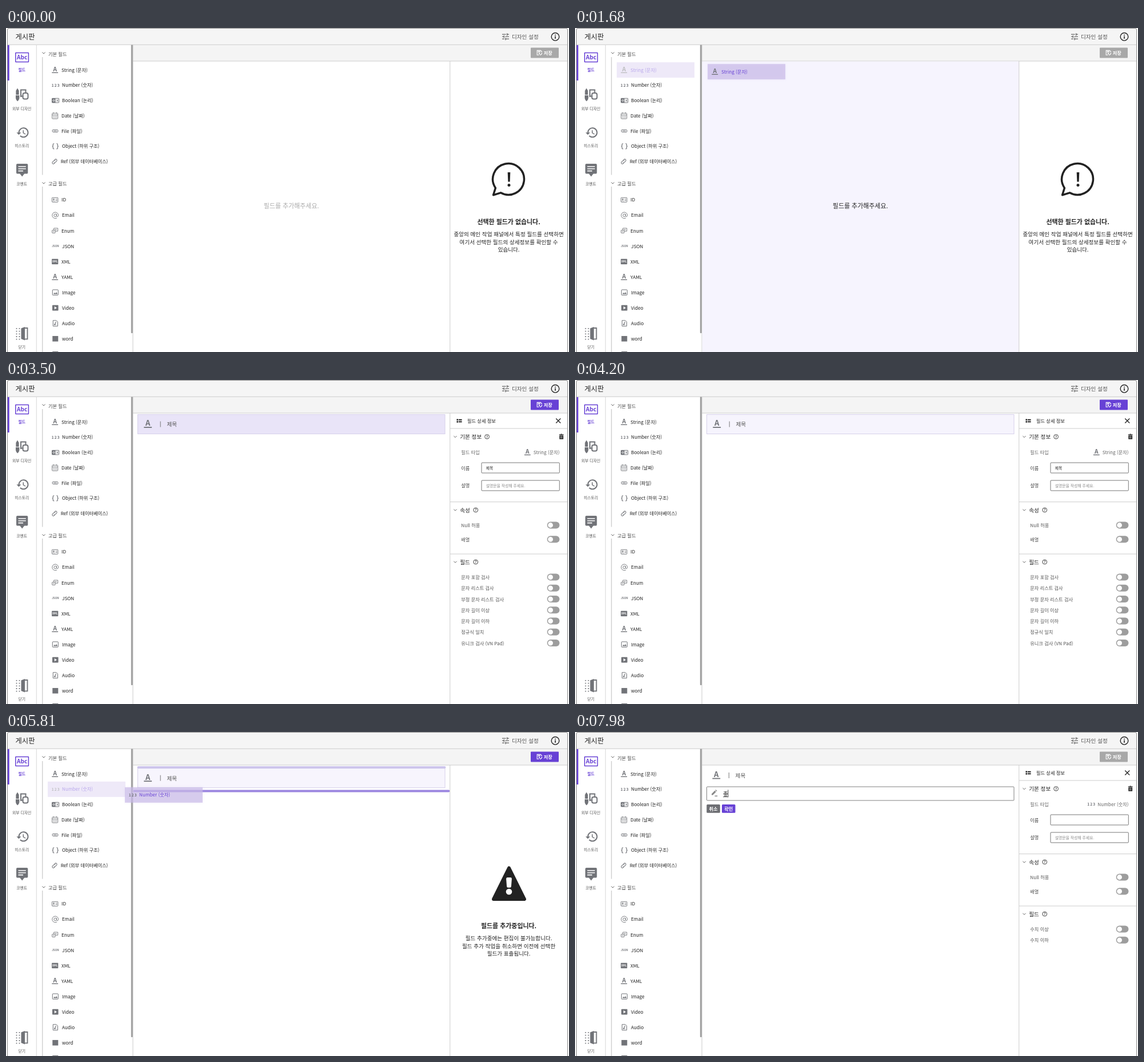
Animation of 985 by 568 pixels, one loop 8 s. Source, as an HTML page:

```html
<!DOCTYPE html>
<html lang="ko">
<head>
<meta charset="utf-8">
<title>게시판</title>
<style>
html, body { margin: 0; width: 100%; height: 100%; overflow: hidden; background: #fff; }
svg { display: block; width: 985px; height: 568px; }
text { font-family: "Noto Sans CJK KR", "Noto Sans CJK", "Noto Sans", sans-serif; white-space: pre; }
</style>
</head>
<body>
<svg id="stage" viewBox="0 0 985 568" xmlns="http://www.w3.org/2000/svg"></svg>
<script>
const PURPLE = '#6741d5', GRAY = '#717378', INK = '#222', LINE = '#ccc';
const XS = 6.84, S = 8.2, M = 9.58, L = 10.95;

// Basic shapes; text is placed by its vertical centre.
const text = (x, cy, str, size = S, fill = INK, weight = 400, anchor = 'start') =>
  `<text x="${x}" y="${cy + size * 0.38}" font-size="${size}" fill="${fill}" font-weight="${weight}" text-anchor="${anchor}">${str}</text>`;
const mid = (x, cy, str, size, fill, weight) => text(x, cy, str, size, fill, weight, 'middle');
const rect = (x, y, w, h, fill, extra = '') =>
  `<rect x="${x}" y="${y}" width="${w}" height="${h}" fill="${fill}" ${extra}/>`;
const box = (x, y, w, h, stroke, fill = 'none', r = 0, sw = 1) =>
  rect(x, y, w, h, fill, `stroke="${stroke}" stroke-width="${sw}" rx="${r}"`);
const path = (d, stroke, sw = 1, fill = 'none', extra = '') =>
  `<path d="${d}" stroke="${stroke}" stroke-width="${sw}" fill="${fill}" ${extra}/>`;
const solid = (d, fill) => `<path d="${d}" fill="${fill}" fill-rule="evenodd"/>`;
const ring = (x, y, r, stroke, sw = 1, fill = 'none') =>
  `<circle cx="${x}" cy="${y}" r="${r}" stroke="${stroke}" stroke-width="${sw}" fill="${fill}"/>`;
const dot = (x, y, r, fill) => `<circle cx="${x}" cy="${y}" r="${r}" fill="${fill}"/>`;
const at = (x, y, inner, scale = 1) => `<g transform="translate(${x} ${y}) scale(${scale})">${inner}</g>`;
const chevron = (x, y) => path(`M${x - 2.6} ${y - 1.3}l2.6 2.6 2.6-2.6`, '#555', 0.9);

// Field icons, drawn around 0,0.
const icons = {
  letter: c => mid(0, -1.2, 'A', 10.2, c, 600) + rect(-5.4, 4, 10.8, 1.4, c),
  digits: c => `<text x="-6.7" y="2.4" font-size="6.7" font-weight="700" fill="${c}" letter-spacing="1">123</text>`,
  bool: c => box(-6, -3.8, 12, 7.6, c, 'none', 0.6) + rect(-6, -3.8, 6, 7.6, c) +
    ring(-3, 0, 1.5, '#fff', 0.9) + path('M2 -1.8l2.4 3.6M4.4 -1.8l-2.4 3.6', c, 0.9),
  date: c => box(-5, -4.5, 10, 9.8, c, 'none', 1, 0.9) + path('M-5 -1.5H5M-2.7 -6V-3.5M2.7 -6V-3.5', c, 0.9) +
    path('M-3.2 1H3.4M-3.2 3.2H3.4', c, 1.1, 'none', 'stroke-dasharray="1.3 1.3"'),
  clip: c => path('M4 1.9H-2.6a1.9 1.9 0 0 1 0-4.2H3.2a2.1 2.1 0 0 1 0 4.4M3 -.2H-2.4', c, 1),
  braces: c => path('M-2 -4.6h-.8q-1.2 0-1.2 1.2v1.8q0 1.4-1.4 1.6q1.4.2 1.4 1.6v1.8q0 1.2 1.2 1.2h.8' +
    'M2 -4.6h.8q1.2 0 1.2 1.2v1.8q0 1.4 1.4 1.6q-1.4.2-1.4 1.6v1.8q0 1.2-1.2 1.2h-.8', c, 1.2),
  link: c => `<g transform="rotate(-45)">${path('M-1 2H-3a2 2 0 0 1 0-4H.4a2 2 0 0 1 1.6 2M1 -2H3a2 2 0 0 1 0 4H-.4a2 2 0 0 1-1.6-2', c, 1)}</g>`,
  card: c => box(-5.2, -4, 10.4, 8, c, 'none', 0.8, 0.9) + ring(-2.2, -1, 1, c, 0.8, c) +
    path('M-4 2.3q1.8-2 3.6 0M1 -1.2H4M1 1.2H4', c, 0.9),
  mail: c => ring(0, 0, 2.3, c, 0.9) + path('M2.3 -2.3V.8q.2 1.6 1.6 1.5 1.5-.2 1.5-2.3a5.4 5.4 0 1 0-2.4 4.5', c, 0.9),
  list: c => box(-5, -1, 5.5, 5, c, 'none', 0.5, 0.9) + path('M-2 -1v-3.4h7v5.2h-4.5M0 -2h3M-3.6 1.5h2.6', c, 0.9),
  json: c => mid(0, 0, 'JSON', 4.6, c, 900),
  xml: c => rect(-5.6, -4.8, 11.2, 9.6, c, 'rx="0.8"') + mid(0, 0, 'XML', 4.6, '#fff', 900),
  image: c => box(-5, -4.7, 10, 9.4, c, 'none', 0.8, 1) + solid('M-3.4 3l2-2.8 1.5 1.7 1.7-2.5 2.2 3.6z', c),
  video: c => rect(-5.3, -4.9, 10.6, 9.8, c, 'rx="1"') + solid('M-1.5 -2.6L2.7 0-1.5 2.6z', '#fff'),
  audio: c => path('M-4 -5H1.8L4.2 -2.5V5H-4z', c, 1) + ring(-1, 2, 1, c, 0.8, c) + path('M.1 2V-2H2.2', c, 0.9),
  square: c => rect(-5, -4.8, 10, 9.6, c)
};

// label, text x, icon, icon x, centre y
const basic = [
  ['String (문자)', 97, 'letter', 85.7], ['Number (숫자)', 98, 'digits', 86.5], ['Boolean (논리)', 98, 'bool', 86.6],
  ['Date (날짜)', 97, 'date', 85.7], ['File (파일)', 97, 'clip', 85.7], ['Object (하위 구조)', 98, 'braces', 86.3],
  ['Ref (외부 데이터베이스)', 95.7, 'link', 85]
].map((f, i) => [...f, 73.6 + i * 26.75]);
const advanced = [
  ['ID', 97, 'card', 85.7], ['Email', 98, 'mail', 86.2], ['Enum', 97, 'list', 85.7], ['JSON', 98, 'json', 86.4],
  ['XML', 97, 'xml', 85.7], ['YAML', 97, 'letter', 85.7], ['Image', 98, 'image', 86.3], ['Video', 98, 'video', 86.3],
  ['Audio', 98, 'audio', 86.3], ['word', 98, 'square', 86.3], ['', 98, 'square', 86.3]
].map((f, i) => [...f, 301.3 + i * 27.05]);

const field = ([label, x, icon, ix, y], color = INK) => at(ix, y, icons[icon](GRAY)) + text(x, y, label, S, color, 500);
const fieldBack = (f, fill, extra) => rect(73, f[4] - 13.5, 136, 27, fill, extra);
const activeField = f => fieldBack(f, '#dacff1') + field(f, PURPLE);

function fieldItem(i, s) {
  const f = basic[i];
  if (s.drag === i) return `<g opacity="0.45">${activeField(f)}</g>`;
  return s.hover === i ? activeField(f) : field(f);
}

function ghost(s) {
  const f = basic[s.drag];
  return at(s.dx, s.dy, fieldBack(f, '#c9bdf0', 'opacity="0.25" filter="url(#soft)"') +
    fieldBack(f, '#c8b8e7', 'opacity="0.65"') + field(f, PURPLE));
}

const tune = 'M3 17v2h6v-2H3zM3 5v2h10V5H3zm10 16v-2h8v-2h-8v-2h-2v6h2zM7 9v2H3v2h4v2h2V9H7zm14 4v-2H11v2h10zm-6-4h2V7h4V5h-4V3h-2v6z';
const clock = 'M13 3a9 9 0 0 0-9 9H1l3.9 3.9L9 12H6a7 7 0 1 1 2.06 4.94l-1.42 1.42A9 9 0 1 0 13 3zm-1 5v5l4.28 2.54.72-1.21-3.5-2.08V8z';

const nav =
  rect(3, 30, 2.7, 62, PURPLE) +
  box(16.8, 43.6, 22.6, 16, PURPLE, 'none', 0.5, 1.5) + mid(28.1, 51.6, 'Abc', 10, PURPLE, 700) +
  mid(27.7, 73.5, '필드', XS, PURPLE, 700) +
  solid('M20 105.5l2.6 4.5v7h-5.2v-7zM17 118h6.4v5q-.6 4-3.2 5.5-2.6-1.5-3.2-5.5z', GRAY) +
  path('M26 121V108.5h8.5v5M25.5 119.5h5', GRAY, 2) + box(29.5, 114, 9, 10.5, GRAY, 'none', 3, 2) +
  mid(27.7, 141.3, '외부 디자인', XS, '#555') +
  at(17.5, 171.3, solid(clock, GRAY)) + mid(27.7, 206.5, '히스토리', XS, '#555') +
  rect(18, 238, 20.3, 17.5, GRAY, 'rx="2"') + solid('M24 255h8.5l-4.3 5.6z', GRAY) +
  path('M21.5 243H34.8M21.5 246.8H34.8M21.5 250.6H30', '#fff', 1.6) +
  mid(27.7, 273, '코멘트', XS, '#555') +
  path('M18.5 526V547M23.5 526V547', GRAY, 1.7, 'none', 'stroke-dasharray="1.8 2.9"') +
  solid('M26.5 526.5l6.5-2.5v23.5l-6.5-2.5z', GRAY) + path('M33 526H37.5V545.4H33', GRAY, 1.8) +
  mid(27.7, 559.3, '닫기', XS, '#555');

const shell =
  `<defs><filter id="soft" x="-10%" y="-30%" width="120%" height="160%"><feGaussianBlur stdDeviation="2"/></filter></defs>` +
  rect(0, 0, 985, 568, '#fff') + rect(3, 1, 979.5, 28, '#f5f5f5') + rect(222, 29, 760.5, 29, '#f4f4f4') +
  path('M2.5 568V3q0-2.5 2.5-2.5H980q2.5 0 2.5 2.5V568', '#8a8a8a') +
  path('M3 29.3H982M222 58H982', LINE) + path('M53.3 30V568', '#d8d8d8') + path('M222 29V568', LINE) +
  text(16.5, 15.8, '게시판', 12.3, INK, 500) +
  at(866, 7.2, solid(tune, '#666'), 0.667) + text(885, 15.6, '디자인 설정', M, '#555') +
  ring(961, 15.3, 6.8, INK, 1.4) + rect(960.2, 14.4, 1.6, 4.4, INK) + rect(960.2, 11.6, 1.6, 1.6, INK) +
  nav +
  chevron(66, 43.8) + text(74, 45.4, '기본 필드', S, '#444') +
  chevron(66, 271.8) + text(74, 273.2, '고급 필드', S, '#444') +
  path('M63.8 51V257.5M63.8 278V568', '#bbb') +
  [...basic.slice(2), ...advanced].map(f => field(f)).join('') +
  rect(218.8, 29.5, 3, 505.5, '#a0a0a0', 'rx="1"');

const saveButton = on =>
  rect(918, 34.5, 49, 18, on ? PURPLE : '#a8a8a8', 'rx="1"') +
  path('M932.5 47.3H929.2V39.4H935.4L937.3 41.3V43', '#fff', 1.1) +
  rect(930.6, 40.6, 4.2, 2.1, '#fff') + dot(933, 45, 1.2, '#fff') + path('M934.5 47.8l3.6-3.6', '#fff', 1.4) +
  text(940.8, 43.7, '저장', S, '#fff', 700);

const notice = (title, lines) => mid(879.6, 339.5, title, L, INK, 700) +
  lines.map((l, i) => mid(879.6, 361.3 + i * 13.7, l, M, INK, 500)).join('');

const emptyPanel =
  path('M852.6 292.8L856.4 280.4A27.4 27.4 0 1 1 865.5 288.8Z', INK, 3.5, 'none', 'stroke-linejoin="round"') +
  solid('M877.7 253h4.6l-.7 16.5h-3.2z', INK) + dot(880, 275.6, 2.5, INK) +
  notice('선택한 필드가 없습니다.', ['중앙의 메인 작업 패널에서 특정 필드를 선택하면', '여기서 선택한 필드의 상세정보를 확인할 수', '있습니다.']);

const addingPanel =
  path('M880 238.5L907 293H853Z', INK, 6, INK, 'stroke-linejoin="round"') +
  path('M877.3 257.3H882.7L881.7 270.5H878.3Z', '#fff', 4.4, '#fff', 'stroke-linejoin="round"') + dot(880, 280, 5.3, '#fff') +
  notice('필드를 추가중입니다.', ['필드 추가중에는 편집이 불가능합니다.', '필드 추가 작업을 취소하면 이전에 선택한', '필드가 표출됩니다.']);

const section = (y, label, helpX) => chevron(786, y) + text(794.3, y + 0.3, label, M, INK, 500) +
  ring(helpX, y, 3.9, '#333', 0.9) + mid(helpX, y, '?', 6.2, '#333', 600);
const toggle = (y, label) => text(796.3, y + 0.3, label, S, '#555') +
  rect(946.7, y - 6, 21.8, 12, '#9d9d9d', 'rx="6"') + dot(952.6, y, 4.4, '#fff');

const checks = [
  ['문자 포함 검사', '문자 리스트 검사', '부정 문자 리스트 검사', '문자 길이 이상', '문자 길이 이하', '정규식 일치', '유니크 검사 (VN Pad)'],
  ['수치 이상', '수치 이하']
];

function detailPanel(type, name) {
  return rect(788.5, 68.4, 2.6, 2.6, INK) + rect(788.5, 72, 2.6, 2.6, INK) + path('M792 69.7H797.6M792 73.3H797.6', INK, 2) +
    text(807, 71.6, '필드 상세 정보', S, INK, 500) + path('M962.3 67.5l8 8M970.3 67.5l-8 8', INK, 1.3) +
    path('M777 85H982M777 213.7H982M777 305H982', LINE) +
    section(99.4, '기본 정보', 841.6) +
    solid('M968.3 97.2h6.8v6.6h-6.8zM967.8 95.3h2.3l.6-.8h2l.6.8h2.3v1.1h-7.8z', INK) + path('M970.6 98.4V102.4M972.7 98.4V102.4', '#fff', 0.7) +
    text(796.3, 127.3, '필드 타입', S, '#666') +
    at(type ? 903 : 912.3, 126.6, icons[basic[type][2]](GRAY)) + text(968.5, 127.3, basic[type][0], S, '#666', 400, 'end') +
    text(796.3, 154.5, '이름', S, '#444') + box(832, 145, 136.3, 18, '#777', '#fff', 1) + text(839.7, 154.4, name, XS) +
    text(796.3, 185.2, '설명', S, '#444') + box(832, 176, 136.3, 18, '#777', '#fff', 1) +
    text(839.7, 185.2, '설명문을 작성해 주세요.', XS, '#888') +
    section(227.9, '속성', 821.8) + toggle(254.5, 'Null 허용') + toggle(279.3, '배열') +
    section(319, '필드', 821.8) + checks[type].map((c, i) => toggle(345.6 + i * 19.25, c)).join('');
}

const rowContent = (x, y) => at(x, y - 0.5, icons.letter(GRAY), 1.28) +
  path(`M${x + 22} ${y - 5}v10`, '#777') + text(x + 33.3, y + 0.3, '제목', M, '#555');
const row = (y, fill) => box(230.5, y, 537.5, 34, '#d6d0ea', fill) + rowContent(248.2, y + 17);

function editor(y, typed) {
  const x = 259, w = M * 0.92, n = typed.length, cx = x + w * n;
  return box(230.5, y, 537.5, 24, '#808080', '#fff', 1) +
    solid(`M239 ${y + 14.6}v-2.2l5.6-5.6 2.2 2.2-5.6 5.6zM245.3 ${y + 6.1}l1-1 2.2 2.2-1 1zM244.5 ${y + 15.6}h4.7v1.3h-4.7z`, '#888') +
    (n ? text(x, y + 12, typed, M) + path(`M${cx - w} ${y + 17.7}h${w}`, INK, 0.8)
       : text(258.3, y + 12, '이름을 입력해주세요.', M, '#999')) +
    path(`M${cx} ${y + 5.3}v13`, INK, 0.8) +
    rect(230.3, y + 31, 23.5, 14.8, '#6d6e73', 'rx="1.5"') + mid(242, y + 38.7, '취소', S, '#fff', 700) +
    rect(257, y + 31, 23.5, 14.8, PURPLE, 'rx="1.5"') + mid(268.8, y + 38.7, '확인', S, '#fff', 700);
}

// Latest entry whose time has come.
const latest = (t, keys) => keys.reduce((v, [k, s]) => (t >= k ? s : v), '');
const glide = u => 1 - Math.pow(1 - Math.min(1, u), 2.6);

function stateAt(time) {
  const t = Math.floor(time / 70) * 70;
  const s = { hover: -1, drag: -1, dx: 0, dy: 0, phase: 'empty', typed: '' };
  if (t < 1820) {
    if (t >= 1050) {
      const e = glide((t - 980) / 700);
      Object.assign(s, { drag: 0, dx: Math.round(159 * e), dy: Math.round(3 * e) });
    } else if (t >= 700) s.hover = 0;
  } else if (t < 3500) {
    s.phase = 'first';
    s.typed = latest(t, [[2800, 'ㅈ'], [2940, '제'], [3080, '제모'], [3220, '제목']]);
  } else if (t < 4900) {
    s.phase = 'done';
    s.over = t < 4200;
    if (t >= 4410) s.hover = 1;
  } else if (t < 6370) {
    const e = glide((t - 4830) / 840);
    const k = Math.max(0, Math.min(1, (t - 5670) / 280));
    s.phase = 'adding';
    s.drag = 1;
    s.dx = Math.round(130 * e + 10 * k) - (t >= 6090 ? 1 : 0);
    s.dy = Math.round(9 * e + 2 * k);
    s.over = t >= 5810;
  } else {
    s.phase = 'second';
    s.typed = latest(t, [[7840, 'ㅈ'], [7910, '조'], [7980, '좋']]);
  }
  return s;
}

const phases = {
  empty: s => (s.drag === 0 ? rect(222.5, 58.5, 554, 510, '#f6f4fe') : '') +
    mid(499.2, 311.6, '필드를 추가해주세요.', L, s.drag === 0 ? INK : '#aaa', 500) + emptyPanel,
  first: s => editor(60, s.typed) + detailPanel(0, ''),
  done: s => row(60.5, s.over ? '#e9e4f8' : '#f6f4fd') + detailPanel(0, '제목'),
  adding: s => row(63.7, '#f7f5fd') + rect(229.5, 60, 540, 4, '#cdc5ec', 'rx="2"') +
    rect(222.5, 101.5, 554, 4, s.over ? '#9c86e0' : '#cdc5ec', 'rx="2"') + addingPanel,
  second: s => rowContent(247.3, 76) + editor(96, s.typed) + detailPanel(1, '')
};

const scene = s => shell + fieldItem(0, s) + fieldItem(1, s) +
  saveButton(s.phase === 'done' || s.phase === 'adding') +
  phases[s.phase](s) + path('M776.8 58V568', LINE) + (s.drag >= 0 ? ghost(s) : '');

const stage = document.getElementById('stage');
let shown = '';
function draw(now) {
  const s = stateAt(now % 8000), key = JSON.stringify(s);
  if (key !== shown) {
    stage.innerHTML = scene(s);
    shown = key;
  }
}
const start = performance.now();
const tick = () => {
  draw(performance.now() - start);
  requestAnimationFrame(tick);
};
tick();
</script>
</body>
</html>
```
